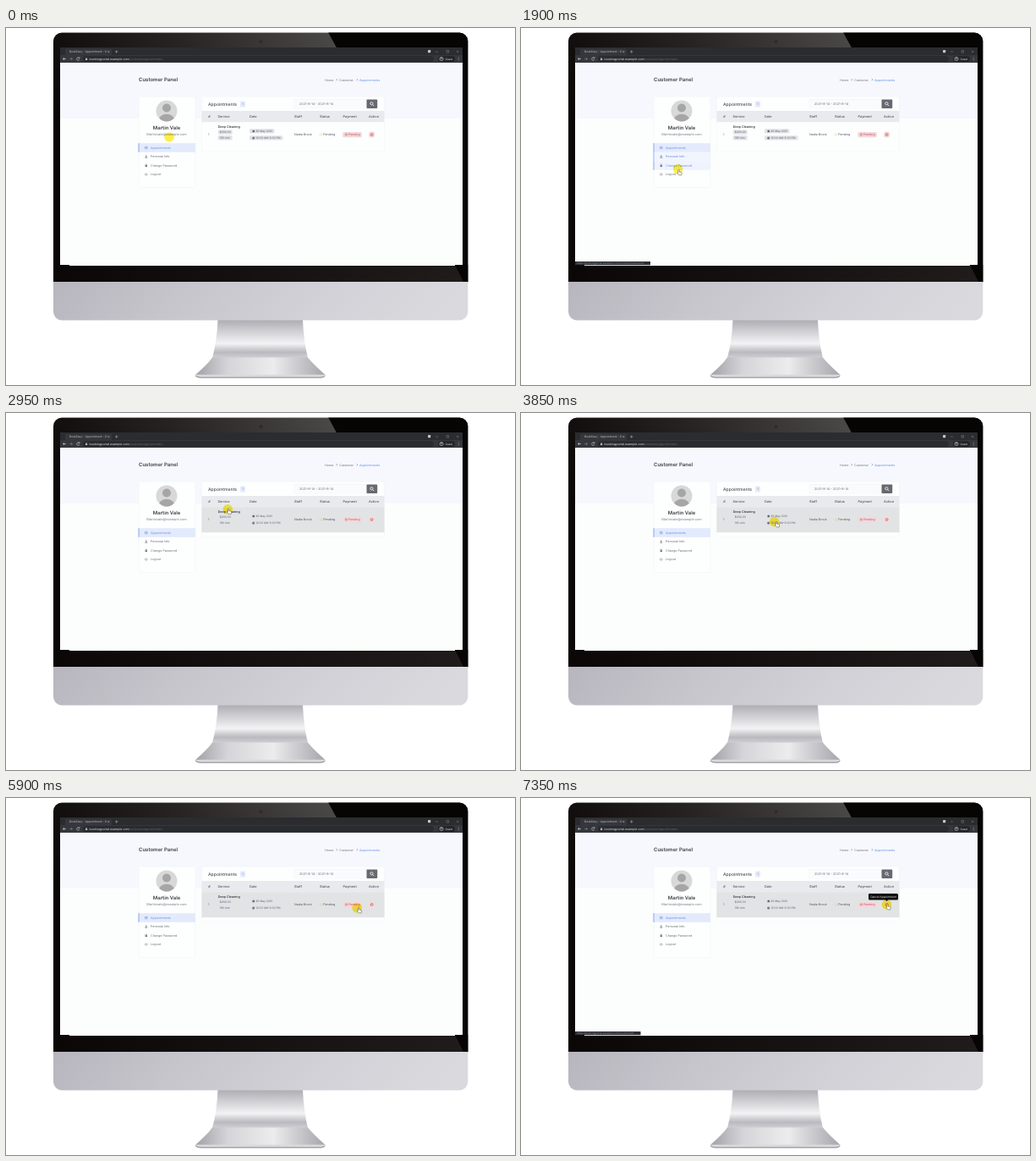
These frames come from a looping animation (602 by 422 pixels, 7.55 s). An HTML page:

```html
<!DOCTYPE html>
<html lang="en">
<head>
<meta charset="utf-8">
<title>Customer Panel</title>
<style>
html, body { margin: 0; width: 100%; height: 100%; overflow: hidden; background: #fff; }
svg { display: block; width: 100%; height: 100%; }
text { font-family: Inter, "Open Sans", sans-serif; white-space: pre; text-rendering: geometricPrecision; }
#glow { mix-blend-mode: multiply; }
</style>
</head>
<body>
<svg id="stage" viewBox="0 0 602 422" xmlns="http://www.w3.org/2000/svg">
  <defs>
    <linearGradient id="bezel" gradientUnits="userSpaceOnUse" x1="91" y1="162" x2="381" y2="5">
      <stop offset="0" stop-color="#0b0706"/><stop offset=".5" stop-color="#262322"/>
      <stop offset="1" stop-color="#4a4847"/>
    </linearGradient>
    <linearGradient id="sill">
      <stop offset="0" stop-color="#0b0706"/><stop offset="1" stop-color="#201c1b"/>
    </linearGradient>
    <linearGradient id="chin" x2="1" y2=".08">
      <stop offset="0" stop-color="#b7b6be"/><stop offset=".35" stop-color="#c7c6cd"/>
      <stop offset=".7" stop-color="#d3d2d8"/><stop offset="1" stop-color="#dad9de"/>
    </linearGradient>
    <linearGradient id="neck" x2="0" y2="1">
      <stop offset="0" stop-color="#adadb3"/><stop offset=".3" stop-color="#cfcfd4"/>
      <stop offset=".62" stop-color="#f3f3f4"/><stop offset=".85" stop-color="#b9b9bf"/>
      <stop offset="1" stop-color="#cfcfd3"/>
    </linearGradient>
    <linearGradient id="foot" x2="1" y2="0">
      <stop offset="0" stop-color="#a0a0a6"/><stop offset=".25" stop-color="#d5d5d9"/>
      <stop offset=".6" stop-color="#ececee"/><stop offset="1" stop-color="#a5a5ab"/>
    </linearGradient>
    <clipPath id="face"><circle cx="190" cy="98" r="12.5"/></clipPath>
    <clipPath id="case"><rect x="56" y="5.5" width="490.3" height="340" rx="10"/></clipPath>
  </defs>
  <g id="monitor">
    <path d="M250.5 345H351Q352 370 357 390H244Q249.5 370 250.5 345Z" fill="url(#neck)"/>
    <path d="M244 389.5H357Q362 396 377.5 410H224Q239 397 244 389.5Z" fill="url(#foot)"/>
    <path d="M224 409.8H377.5L376 413H226Z" fill="#d9d9dc"/>
    <path d="M224 411Q226 413.2 230 413.2H372Q376 413.2 377.5 411" fill="none" stroke="#77777c" stroke-width=".9"/>
    <g clip-path="url(#case)">
      <rect x="55" y="5" width="492" height="296" fill="url(#bezel)"/>
      <rect x="55" y="280" width="492" height="20" fill="url(#sill)"/>
      <path d="M381 5H547V300H541L531 280Z" fill="#070404"/>
      <rect x="55" y="300" width="492" height="46" fill="url(#chin)"/>
    </g>
    <circle cx="301.5" cy="16" r="1.6" fill="#1c1716"/><circle cx="301.5" cy="16" r=".7" fill="#8a4a42"/>
  </g>
  <g id="page"></g>
  <g id="tip">
    <path d="M412 113H444.5Q446 113 446 114.5V119Q446 120.5 444.5 120.5H434L432.5 122L431 120.5H412.5Q411 120.5 411 119V114.5Q411 113 412 113Z" fill="#0c0c0d"/>
  </g>
  <circle id="glow" r="5.8" fill="#fff04a"/>
  <path id="hand" d="M-.6 .3Q-.6-.7 .1-.7T.8 .3V2.1L3 2.6Q3.9 2.9 3.7 3.8L3.2 5.9H.3L-1.5 3.8Q-1.9 3-1.2 2.8L-.6 3.2Z" fill="#fff" stroke="#4b471c" stroke-width=".5"/>
</svg>
<script>
const LOOP = 7550;
const NS = "http://www.w3.org/2000/svg";
const $ = id => document.getElementById(id);
const page = $("page");

function add(tag, attrs, parent = page) {
  const el = document.createElementNS(NS, tag);
  for (const k in attrs) el.setAttribute(k, attrs[k]);
  return parent.appendChild(el);
}
const rect = (x, y, width, height, fill, extra) => add("rect", { x, y, width, height, fill, ...extra });
const dot = (cx, cy, r, fill, extra) => add("circle", { cx, cy, r, fill, ...extra });
const line = (d, stroke, w = 0.6, extra) => add("path", { d, stroke, "stroke-width": w, fill: "none", ...extra });

// Text centred vertically on y
function label(x, y, size, str, fill, weight = 400, anchor = "start", parent = page) {
  const el = add("text", { x, y: y + size * 0.36, "font-size": size, fill, "font-weight": weight, "text-anchor": anchor }, parent);
  el.textContent = str;
  return el;
}

function browser() {
  rect(64, 23, 476, 9.5, "#2b2c30");
  rect(70, 24.5, 55, 8, "#36373c", { rx: 1.5 });
  rect(64, 32, 476, 9, "#36373c");
  rect(91, 33, 415, 7, "#2a2b2f", { rx: 3.5 });
  label(75, 28, 3.3, "BookEasy - Appointment - S", "#c0c0c5");
  line("M120.4 27.2l1.8 1.8m0-1.8l-1.8 1.8M129 28h3.4M130.7 26.3v3.4", "#c4c4c9", 0.5);
  rect(499, 26, 3.2, 3.2, "#c6c6ca", { rx: 0.6 });
  line("M508 28h3M521 26.5h2.5v2.6H521ZM533 26.7l2.4 2.4m0-2.4l-2.4 2.4", "#85858a", 0.5);
  line("M71 36.5h-3.5l1.5-1.5m-1.5 1.5l1.5 1.5", "#e0e0e4");
  line("M75 36.5h3.5l-1.5-1.5m1.5 1.5l-1.5 1.5", "#85868c");
  line("M86.8 35.6a1.7 1.7 0 1 0 .1 1.7M87 34.3v1.4h-1.4", "#d4d4d8");
  rect(94, 36.2, 2.2, 1.8, "#c0c0c5");
  line("M94.5 36.2v-.7a.6.6 0 0 1 1.2 0v.7", "#c0c0c5", 0.4);
  label(98.5, 36.6, 3.6, "bookingportal.example.com", "#e0e0e4");
  label(146, 36.6, 3.4, "/customer/appointments", "#696a70");
  rect(511, 33.3, 20, 6.6, "#232428", { rx: 3.3 });
  dot(515, 36.5, 2.1, "none", { stroke: "#d8d8dc", "stroke-width": 0.6 });
  dot(515, 36, 0.8, "#d8d8dc");
  label(519.5, 36.6, 3.2, "Guest", "#e2e2e5");
  for (const y of [34.9, 36.5, 38.1]) dot(535.2, y, 0.45, "#d8d8dc");
}

function backdrop() {
  rect(64, 41, 476, 239, "#fcfefd");
  rect(75, 279, 456, 2, "#fcfefd");
  rect(64, 41, 476, 66, "#f6f8fe");
  label(157, 61, 6, "Customer Panel", "#3c3e44", 600);
  label(377, 61.2, 3.7, "Home", "#73767c");
  line("M390.5 60l1.2 1.2-1.2 1.2M414.8 60l1.2 1.2-1.2 1.2", "#777a80", 0.6);
  label(394, 61.2, 3.7, "Customer", "#73767c");
  label(418, 61.2, 3.7, "Appointments", "#6c91e8");
}

const MENU = ["Appointments", "Personal Info", "Change Password", "Logout"];
let hovers;

function profile() {
  rect(157, 81, 67, 107.5, "#fdfefe", { rx: 1.5, stroke: "#f2f4f6", "stroke-width": 0.6 });
  dot(190, 98, 12.5, "#d8d8d8");
  const body = { "clip-path": "url(#face)" };
  dot(190, 94.5, 5, "#a6a6a6", body);
  add("ellipse", { cx: 190, cy: 110.2, rx: 9.8, ry: 8.5, fill: "#a6a6a6", ...body });
  label(190, 118.2, 5.9, "Martin Vale", "#3c3e44", 600, "middle");
  label(190, 125.2, 3.9, "Martinvale@example.com", "#7a7d83", 400, "middle");
  hovers = MENU.map((name, i) => {
    const y = 141.5 + i * 10.5, on = i === 0;
    const ink = on ? "#6c8fe6" : "#6d7076";
    label(171, y, 3.65, name, ink);
    const g = add("g", {});
    add("rect", { x: 157, y: y - 5.3, width: 67, height: 10.6, fill: on ? "#e3eafc" : "#eff3fe" }, g);
    add("rect", { x: 156.5, y: y - 5.3, width: 1, height: 10.6, fill: "#87a5f3" }, g);
    label(171, y, 3.65, name, "#6c8fe6", 400, "start", g);
    icon(i, 165.8, y, ink);
    return g;
  });
}

function icon(i, x, y, c) {
  if (i === 0) line(`M${x - 1.3} ${y - 1.1}h2.6v2.5h-2.6ZM${x - 1.3} ${y - .2}h2.6`, c, 0.5);
  else if (i === 1) {
    dot(x, y - 0.8, 0.75, c);
    line(`M${x - 1.2} ${y + 1.5}q0-1.4 1.2-1.4t1.2 1.4Z`, c, 0.5);
  } else if (i === 2) {
    rect(x - 1.2, y - 0.2, 2.4, 1.8, c);
    line(`M${x - .8} ${y}v-.9a.8.8 0 0 1 1.6 0v.9`, c, 0.5);
  } else line(`M${x - .8} ${y - 1}a1.3 1.3 0 1 0 1.6 0M${x} ${y - 1.7}v1.5`, c, 0.5);
}

let rowShade;
function badge(x, y, w, str, size, textX) {
  rect(x, y, w, 5.4, "#e2e3e8", { rx: 1.4 });
  label(textX, y + 2.8, size, str, "#5c5f65");
}

function table() {
  rect(231.5, 81, 216, 65, "#fdfefe", { rx: 1.5, stroke: "#f2f4f6", "stroke-width": 0.6 });
  label(239, 90, 5.1, "Appointments", "#4a4d52", 500);
  rect(277, 86.6, 6, 6.8, "#e4eafa", { rx: 1.2 });
  label(280, 90, 3.5, "1", "#6285dc", 500, "middle");
  rect(341, 84.5, 86, 10.6, "#fafbfc", { stroke: "#eff1f3", "stroke-width": 0.5 });
  label(347, 89.9, 3.75, "2021-8-14 - 2021-8-14", "#6c6f74");
  rect(426.5, 84.5, 12.7, 10.6, "#666a70", { rx: 1 });
  dot(432.4, 89.3, 1.6, "none", { stroke: "#fff", "stroke-width": 0.8 });
  line("M433.6 90.5l1.5 1.5", "#fff", 0.9);

  rect(231.5, 98, 216, 13.2, "#e9eaed");
  const heads = [[239.3, "#"], [250.5, "Service"], [288, "Date"], [341, "Staff"], [371, "Status"], [398.5, "Payment"], [429, "Action"]];
  for (const [x, s] of heads) label(x, 104.6, 3.9, s, "#505358", 500);

  rowShade = rect(231.5, 111.2, 216, 30, "#e2e3e4");
  label(239, 126, 3.5, "1", "#55585d");
  label(250.7, 116.8, 3.7, "Deep Cleaning", "#3a3c41", 600);
  badge(250.7, 120.4, 17, "$200.00", 3.3, 252.8);
  badge(250.7, 127, 17, "180 min", 3.3, 252.8);
  badge(288, 119.2, 29.5, "29 May 2021", 3.25, 295.3);
  badge(288, 127.2, 39.5, "12:00 AM-3:00 PM", 3.3, 295.3);
  rect(291.5, 120.7, 2.5, 2.6, "#64676d", { rx: 0.4 });
  dot(292.7, 129.9, 1.5, "#64676d");
  line("M292.7 129v1l.7.4", "#e4e5e9", 0.4);
  label(341, 126, 3.6, "Nadia Brook", "#55585d");
  dot(372.4, 126, 1.3, "none", { stroke: "#eac26c", "stroke-width": 0.65, "stroke-dasharray": ".8 .6" });
  label(375.2, 126, 3.65, "Pending", "#55585d");
  rect(398.3, 123, 22.5, 6.2, "#f3d8db", { rx: 1.5 });
  dot(402.4, 126, 1.25, "none", { stroke: "#cc6670", "stroke-width": 0.55 });
  line("M402.4 125.2v.9h.6", "#cc6670", 0.4);
  label(405, 126.1, 3.5, "Pending", "#bf4f5b");
  rect(429.2, 122.6, 6.8, 6.8, "#f5dcdf", { rx: 2 });
  dot(432.6, 126, 1.5, "none", { stroke: "#cc6670", "stroke-width": 0.8 });
  line("M431.5 127.1l2.2-2.2", "#cc6670", 0.6);
}

browser();
backdrop();
profile();
table();
const status = rect(64, 276, 89, 4.2, "#2e2f34");
const statusText = label(66, 278.2, 3, "", "#8e8f94");
label(428.5, 116.9, 3.2, "Cancel Appointment", "#f2f2f2", 400, "middle", $("tip"));

// Pointer stops: time, x, y
const PATH = [
  [0, 193, 129], [500, 193, 129], [1050, 191, 131], [1200, 190, 133],
  [1900, 185.5, 168], [2000, 188, 167], [2750, 264, 116], [2950, 262, 113.5], [3200, 262, 113.5],
  [3850, 301, 129], [4000, 302, 129], [4750, 364, 128], [5050, 382, 128],
  [5550, 405, 129], [5900, 416, 130], [6350, 432.5, 126]
];
const clamp = v => Math.max(0, Math.min(1, v));
const smooth = v => v * v * (3 - 2 * v);
const fade = (t, from, len) => smooth(clamp((t - from) / len));

function pointerAt(t) {
  const i = PATH.findIndex(p => p[0] > t);
  if (i < 0) return PATH[PATH.length - 1].slice(1);
  const a = PATH[i - 1], b = PATH[i];
  const k = (t - a[0]) / (b[0] - a[0]);
  const e = (k + smooth(k)) / 2;
  return [a[1] + (b[1] - a[1]) * e, a[2] + (b[2] - a[2]) * e];
}

function show(el, opacity) { el.setAttribute("opacity", opacity); }
function move(el, x, y) { el.setAttribute("transform", `translate(${x} ${y})`); }

function render(t) {
  const [x, y] = pointerAt(t);
  const [gx, gy] = pointerAt(Math.max(0, t - 40));
  move($("glow"), gx, gy);
  move($("hand"), x + 1, y);
  show($("hand"), t >= 1300 ? 1 : 0);

  // Menu rows light up in turn and linger while fading
  show(hovers[1], fade(t, 1500, 150) * (1 - fade(t, 1840, 220)));
  show(hovers[2], fade(t, 1700, 180) * (1 - fade(t, 2080, 200)));
  show(hovers[3], 0);

  show(rowShade, fade(t, 2500, 150));
  show($("tip"), fade(t, 6200, 150));

  const first = t >= 1400 && t < 2250, last = t >= 6400;
  show(status, first || last ? 1 : 0);
  status.setAttribute("width", last ? 77.5 : 89);
  statusText.textContent = first ? "https://bookingportal.example.com/customer/password"
    : last ? "https://bookingportal.example.com/customer/#" : "";
}

const start = performance.now();
function tick(now) {
  render(Math.max(0, now - start) % LOOP);
  requestAnimationFrame(tick);
}
render(0);
requestAnimationFrame(tick);
</script>
</body>
</html>
```
